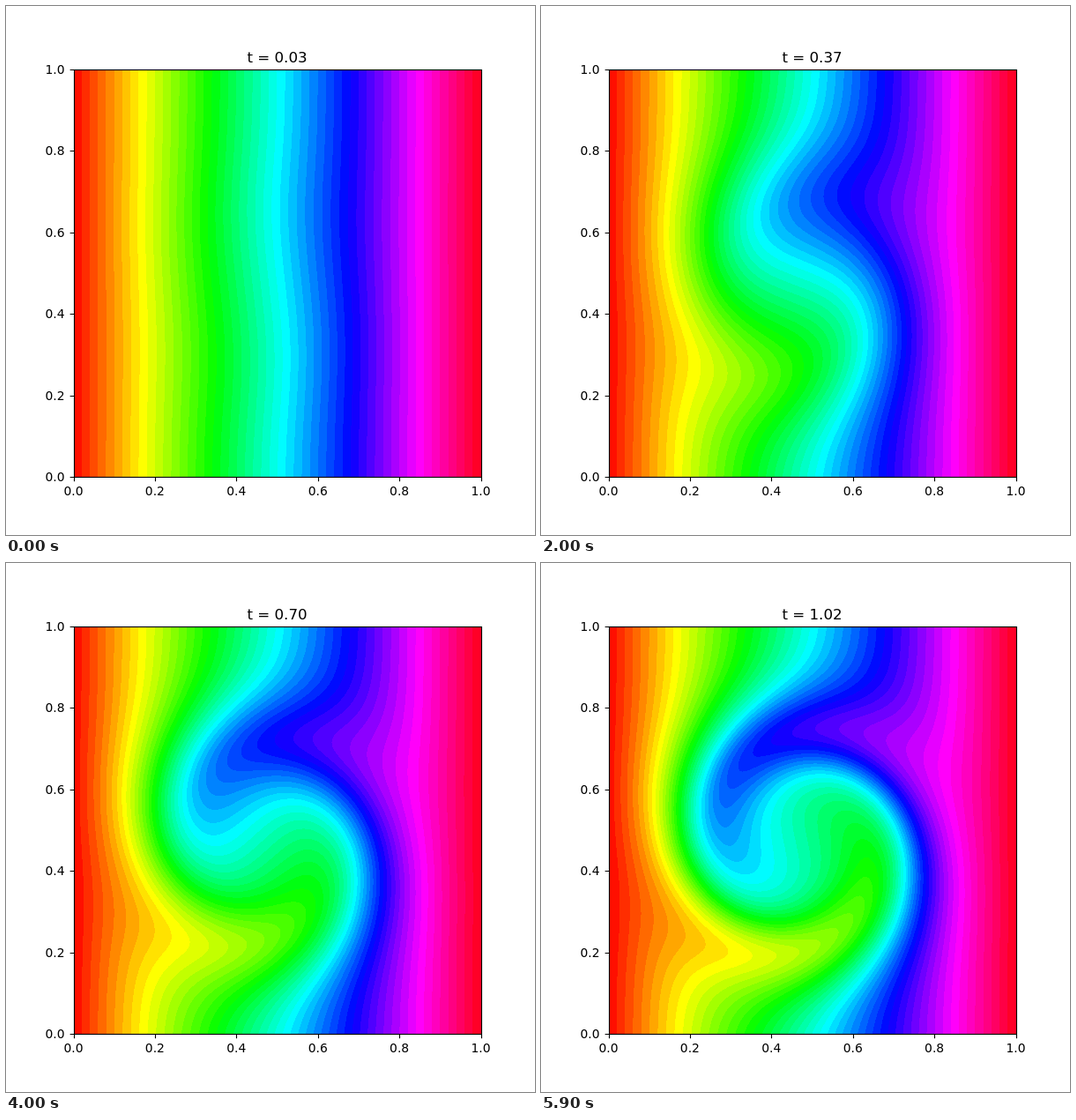
Animation, 600 px wide and 600 px high, one loop 6000 ms. Source, as an HTML page with a canvas:

```html
<!DOCTYPE html>
<html lang="en">
<head>
<meta charset="utf-8">
<title>Swirling contours</title>
<style>
  html, body { margin: 0; width: 100%; height: 100%; overflow: hidden; background: #fff; }
  canvas { display: block; width: 600px; height: 600px; }
</style>
</head>
<body>
<canvas id="stage" width="600" height="600"></canvas>
<script>
const ctx = document.getElementById('stage').getContext('2d');
const SIZE = 462, LEFT = 77, TOP = 72, BOTTOM = 534, X0 = 76.5;
const STEPS = 60, STEP_MS = 100, BANDS = 50;

// Vortex: angular speed SPIN * exp(-(r / REACH)^2.6) around (CX, CY)
const CX = 0.46, CY = 0.47, SPIN = 3.3, REACH = 0.267, MIXING = 0.3;

const spin = new Float32Array(SIZE * SIZE);
const mix = new Float32Array(SIZE * SIZE);
const dx = i => (LEFT + i + 0.5 - X0) / SIZE - CX;
const dy = j => 1 - (j + 0.5) / SIZE - CY;

for (let j = 0, k = 0; j < SIZE; j++) {
  for (let i = 0; i < SIZE; i++, k++) {
    const r = Math.hypot(dx(i), dy(j));
    spin[k] = SPIN * Math.exp(-Math.pow(r / REACH, 2.6));
    mix[k] = MIXING * Math.exp(-Math.pow(r / 0.22, 4));
  }
}

// One packed opaque colour per contour band, running round the hue circle
const palette = Uint32Array.from({ length: BANDS }, (_, n) => {
  const hue = 5.90625 * (n + 0.5) / BANDS;
  const channel = shift => {
    const d = Math.abs((hue + shift) % 6 - 3);
    return Math.round(255 * Math.min(1, Math.max(0, 2 - d)));
  };
  const r = 255 - Math.round(255 * Math.min(1, Math.max(0, 2 - Math.abs(hue - 3))));
  const red = Math.round(255 * Math.min(1, Math.max(0, Math.abs(hue - 3) - 1)));
  return (255 << 24 | channel(5) << 16 | channel(1) << 8 | red) >>> 0;
});

const image = ctx.createImageData(SIZE, SIZE);
const pixels = new Uint32Array(image.data.buffer);

function drawField(t) {
  for (let j = 0, k = 0; j < SIZE; j++) {
    const y = dy(j);
    for (let i = 0; i < SIZE; i++, k++) {
      const a = spin[k] * t;
      const start = dx(i) * Math.cos(a) + y * Math.sin(a);
      const c = CX + start * (1 - mix[k] * t * t);
      pixels[k] = palette[Math.max(0, Math.min(BANDS - 1, Math.floor(c * BANDS)))];
    }
  }
  ctx.putImageData(image, LEFT, TOP);
}

function text(str, x, y, size, align) {
  ctx.font = size + 'px "DejaVu Sans", sans-serif';
  ctx.textAlign = align;
  ctx.fillText(str, x, y);
}

function drawAxes(t) {
  const snap = v => Math.floor(v + 0.5) + 0.5;
  ctx.fillStyle = ctx.strokeStyle = '#000';
  ctx.lineWidth = 1.11;
  ctx.strokeRect(LEFT + 0.5, TOP + 0.5, SIZE, SIZE);
  ctx.beginPath();
  for (let n = 0; n <= 5; n++) {
    const x = X0 + n * SIZE / 5, y = BOTTOM - n * SIZE / 5;
    const label = (n / 5).toFixed(1);
    ctx.moveTo(snap(x), BOTTOM + 0.5);
    ctx.lineTo(snap(x), BOTTOM + 5.36);
    ctx.moveTo(LEFT + 0.5, snap(y));
    ctx.lineTo(LEFT - 4.36, snap(y));
    text(label, x, 555, 13.89, 'center');
    text(label, 66.5, Math.round(y) + 5, 13.89, 'right');
  }
  ctx.stroke();
  text('t = ' + t.toFixed(2), 307.5, 64, 16.67, 'center');
}

let shown = -1;
function tick() {
  const step = Math.floor(performance.now() / STEP_MS) % STEPS;
  if (step !== shown) {
    shown = step;
    const t = (step + 2) / STEPS;
    ctx.fillStyle = '#fff';
    ctx.fillRect(0, 0, 600, 600);
    drawField(t);
    drawAxes(t);
  }
  requestAnimationFrame(tick);
}
tick();
</script>
</body>
</html>
```
